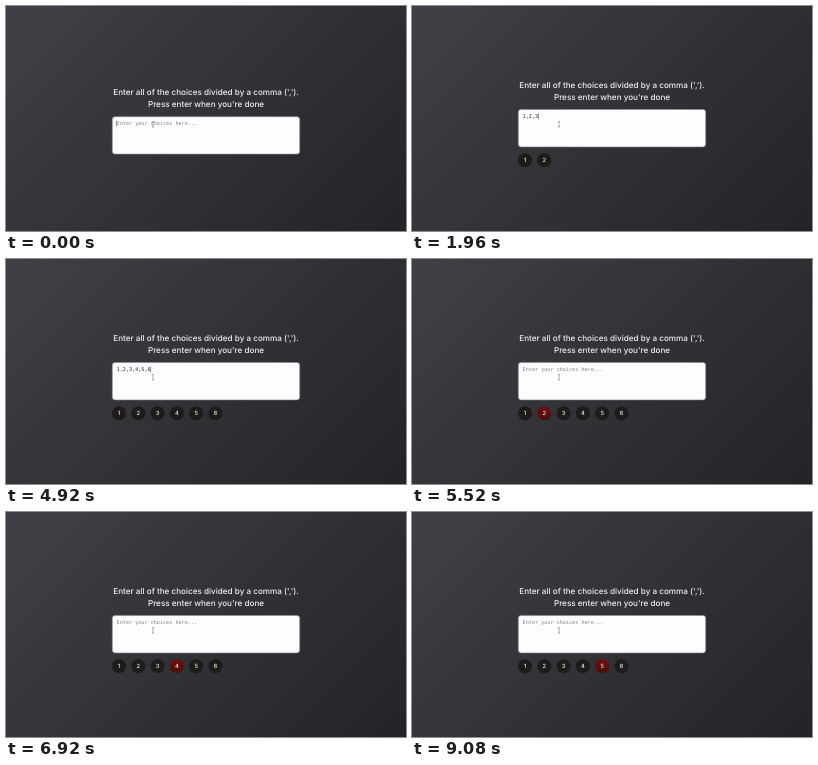
An HTML page for the animation above (9.12 s loop, 400x225 px).

```html
<!DOCTYPE html>
<html lang="en">
<head>
<meta charset="utf-8">
<title>Random choice picker</title>
<style>
  html, body { margin: 0; height: 100%; overflow: hidden; }
  body { background: linear-gradient(135deg, #404146, #232428); }
  svg { display: block; width: 100vw; height: 100vh; text-rendering: geometricPrecision; }
  .title, .chip text { font-family: Inter, sans-serif; font-weight: 500; fill: #f0f0f0; text-anchor: middle; }
  .title { font-size: 8.13px; }
  .chip text { font-size: 5.8px; }
  .chip circle { fill: #1e1b19; }
  .chip.on circle { fill: url(#red); }
  #entry { font: 5.15px "DejaVu Sans Mono", monospace; fill: #222; white-space: pre; }
  #entry.empty { fill: #858585; }
</style>
</head>
<body>
<svg viewBox="0 0 400 225">
  <linearGradient id="red" x2="0" y2="1">
    <stop stop-color="#740d09"/><stop offset="1" stop-color="#49100c"/>
  </linearGradient>
  <g id="page">
    <text class="title" x="200" y="81.5">Enter all of the choices divided by a comma (',').</text>
    <text class="title" x="200" y="93.8">Press enter when you're done</text>
    <rect x="106.3" y="103.5" width="187.4" height="37.4" rx="2.8" fill="#fefcff" stroke="#8c8c90" stroke-width=".6"/>
    <text id="entry" x="110.6" y="112.1"></text>
    <rect id="caret" y="107.2" width=".5" height="6.4" fill="#444"/>
    <g id="chips"></g>
  </g>
  <path d="M145.9 115.6h2.2M147 115.6v5.4M145.9 121h2.2" fill="none" stroke="#777" stroke-width=".6"/>
</svg>
<script>
const LOOP = 9120, CHAR_WIDTH = 3.1, TEXT_X = 110.6;
const TYPED = "1,2,3,4,5,6";
const KEY_TIMES = [280, 840, 1400, 1640, 1960, 2320, 2640, 2920, 3240, 3480, 3840];
const CHIP_TIMES = [400, 1480, 2120, 2720, 3400, 3920];
const SUBMIT = 4960, PICK_START = 5060, PICK_STEP = 100;
const PICKS = "36142561352641352641632515";
const CARET_ON = 520, CARET_PERIOD = 1080;

const $ = id => document.getElementById(id);
const page = $("page"), entry = $("entry"), caret = $("caret");

$("chips").innerHTML = CHIP_TIMES.map((_, i) =>
  `<g class="chip" transform="translate(${113 + i * 19.3} 154.2)">
     <circle r="7"/><text y="2.1">${i + 1}</text></g>`).join("");
const chips = [...document.querySelectorAll(".chip")];

function pickAt(t) {
  const step = Math.floor((t - PICK_START) / PICK_STEP);
  return step < 0 ? 0 : +PICKS[Math.min(step, PICKS.length - 1)];
}

function draw(t) {
  const count = t < SUBMIT ? KEY_TIMES.filter(k => k <= t).length : 0;
  entry.textContent = count ? TYPED.slice(0, count) : "Enter your choices here...";
  entry.classList.toggle("empty", !count);

  // Each key press restarts the caret blink
  const lastKey = Math.max(0, ...KEY_TIMES.filter(k => k <= t));
  caret.setAttribute("x", TEXT_X - 0.1 + count * CHAR_WIDTH);
  caret.style.opacity = (t - lastKey) % CARET_PERIOD < CARET_ON ? 1 : 0;

  // The column is centred, so the first row of chips lifts it
  page.setAttribute("transform", `translate(0 ${t < CHIP_TIMES[0] ? 7.2 : 0})`);
  const pick = pickAt(t);
  chips.forEach((chip, i) => {
    chip.style.display = t < CHIP_TIMES[i] ? "none" : "";
    chip.classList.toggle("on", pick === i + 1);
  });
}

function tick() {
  draw(performance.now() % LOOP);
  requestAnimationFrame(tick);
}
tick();
</script>
</body>
</html>
```
